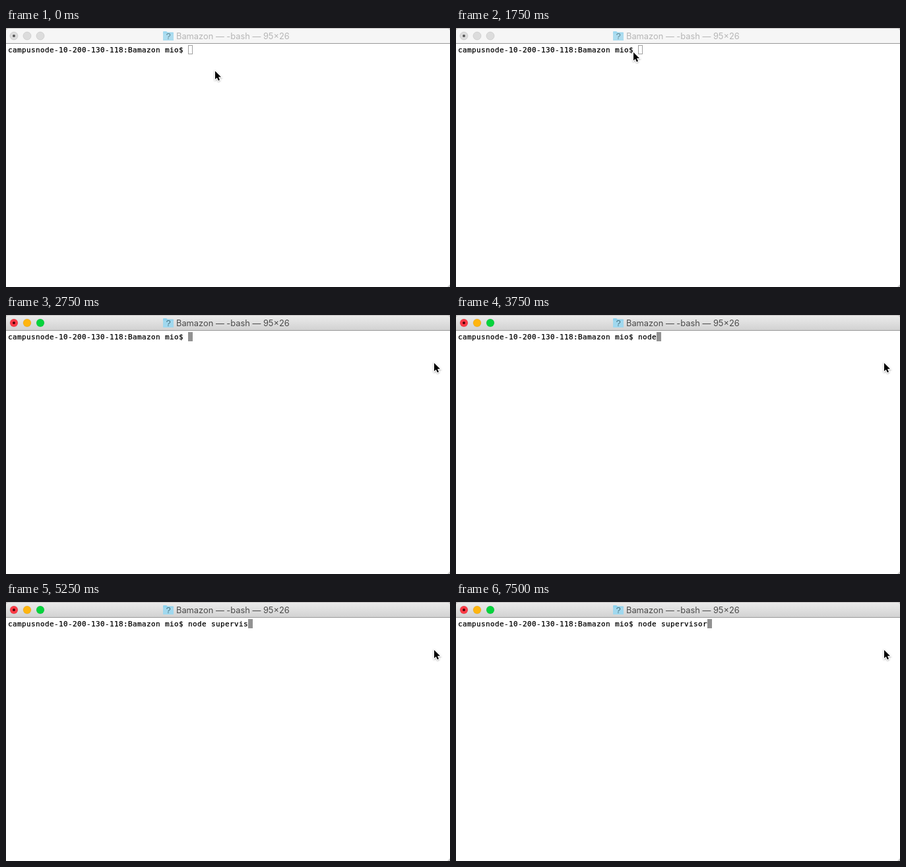
An HTML page that plays this animation: 673 by 394 pixels, repeating every 8 s.

```html
<!DOCTYPE html>
<html lang="en">
<head>
<meta charset="utf-8">
<style>
  html, body { margin: 0; width: 100%; height: 100%; overflow: hidden; background: #fff; }
  svg { display: block; }
  .title { font: 12.85px Inter, "Liberation Sans", sans-serif; fill: #4a4a4a; }
  .shell { font: 11px "DejaVu Sans Mono", monospace; letter-spacing: .378px; white-space: pre; stroke: #000; stroke-width: .25; }
  .light { stroke-width: .5; stroke: #0002; }
  .bar { fill: url(#bar); }
  #caret { fill: #929292; stroke: #929292; }
  .idle .bar { fill: #f6f6f6; }
  .idle .title { fill: #b6b6b6; }
  .idle .light { fill: #dcdcdc; stroke: #bbb; }
  .idle #dot { fill: #555; }
  .idle #caret { fill: none; stroke: #a0a0a0; }
</style>
</head>
<body>
<svg id="win" width="673" height="394">
  <defs>
    <linearGradient id="bar" x2="0" y2="1">
      <stop stop-color="#ebebeb"/><stop offset="1" stop-color="#d2d2d2"/>
    </linearGradient>
    <filter id="shadow" x="-50%" y="-50%" width="200%" height="200%">
      <feDropShadow dx="0" dy="1" stdDeviation=".8" flood-opacity=".35"/>
    </filter>
  </defs>
  <rect width="673" height="394" fill="#fff"/>
  <rect width="673" height="23" fill="#c4c0c0"/>
  <path class="bar" d="M0 23V5Q0 1 4 1H669Q673 1 673 5V23Z"/>
  <path d="M0 23.5H673" stroke="#989898"/>
  <path d="M673 390V394H669Z" fill="#ccc"/>
  <circle class="light" cx="12" cy="12" r="6" fill="#fc3a45"/>
  <circle class="light" cx="32" cy="12" r="6" fill="#ffb50f"/>
  <circle class="light" cx="52" cy="12" r="6" fill="#05d33c"/>
  <circle id="dot" cx="12" cy="12" r="2" fill="#4a0006"/>
  <g id="folder">
    <path d="M238 19V6Q238 5 239 5H243L245 6.500H253Q254 6.500 254 7.500V19Z" fill="#8fd3ee"/>
    <path d="M238 8.500H254V19H238Z" fill="#a0d8ee"/>
    <text x="246" y="17" text-anchor="middle" font-family="Liberation Sans, sans-serif" font-size="13" fill="#47707f">?</text>
  </g>
  <text class="title" x="258" y="17">Bamazon — -bash — 95×26</text>
  <text id="line" class="shell" x="3" y="37"></text>
  <rect id="caret" y="26.500" width="6" height="13"/>
  <path id="pointer" d="M0 0V12.500L2.800 9.900L4.900 14.500L7 13.600L5 9.100H9Z"
    stroke="#fff" stroke-width="2" paint-order="stroke" filter="url(#shadow)"/>
</svg>
<script>
const LOOP = 8000, CELL = 7;
const PROMPT = "campusnode-10-200-130-118:Bamazon mio$ ";
const COMMAND = "node supervisor";

// [start ms, x, y]
const moves = [[0, 317, 65.5], [250, 281, 42], [500, 281, 39], [1750, 269, 37],
  [2250, 491, 66], [2500, 650, 73], [2750, 649, 73]];
// [start ms, characters typed]
const keys = [[0, 0], [3500, 1], [3750, 4], [4000, 6], [4250, 8], [4500, 10],
  [4750, 11], [5000, 12], [5250, 13], [5750, 14], [6000, 15]];

const el = id => document.getElementById(id);
const latest = (steps, t) => steps.findLast(s => s[0] <= t);

function draw(now) {
  const t = now % LOOP;
  const [, x, y] = latest(moves, t);
  const [, typed] = latest(keys, t);
  el("win").classList.toggle("idle", t < 2000);
  el("folder").setAttribute("opacity", t < 2000 ? .85 : 1);
  el("line").textContent = PROMPT + COMMAND.slice(0, typed);
  el("caret").setAttribute("x", 3.5 + CELL * (PROMPT.length + typed));
  el("pointer").setAttribute("transform", `translate(${x} ${y})`);
  requestAnimationFrame(draw);
}
draw(performance.now());
</script>
</body>
</html>
```
